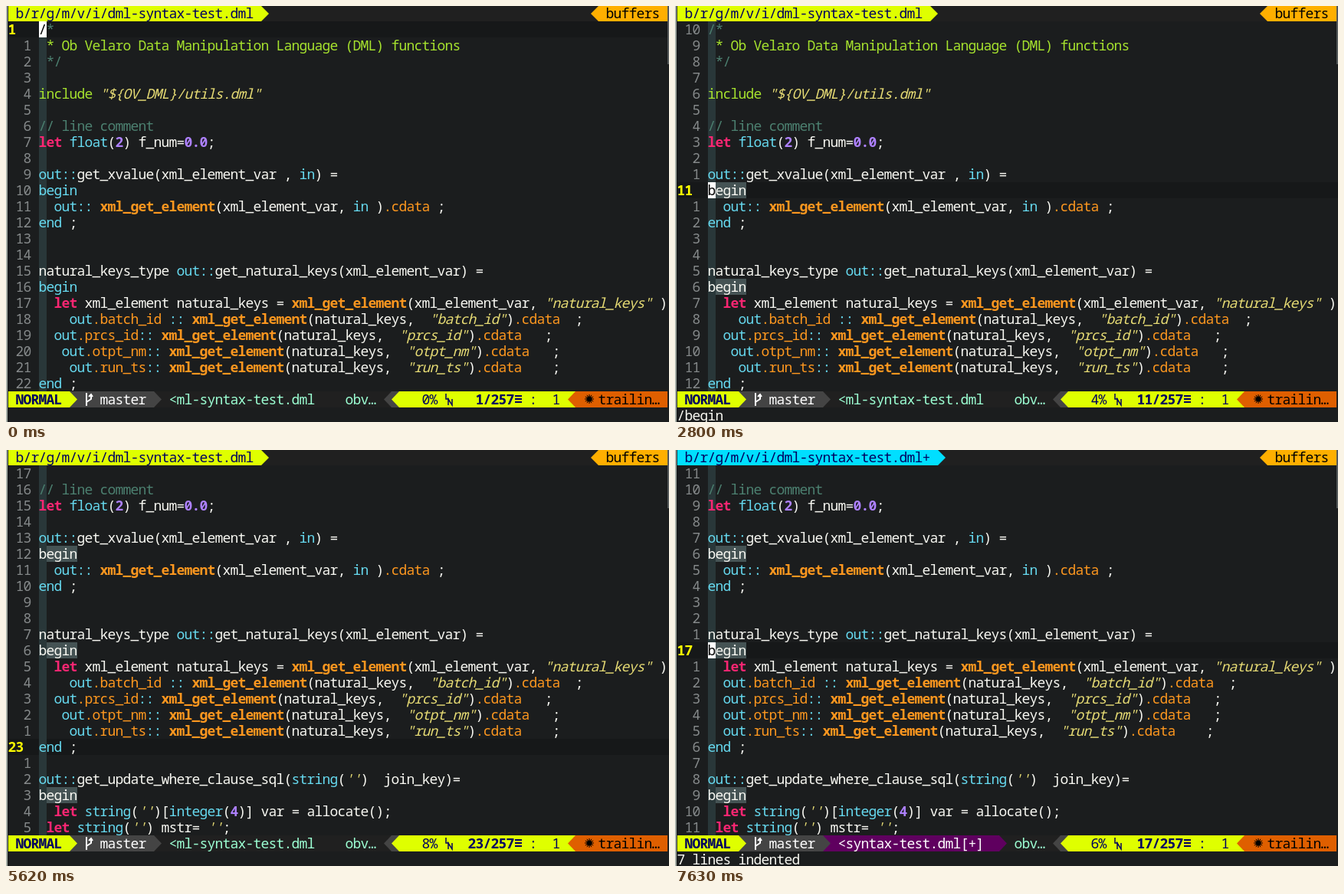
Write an HTML page with a canvas that moves like this. It is 865 px wide and 543 px high and loops after 8000 ms.

```html
<!DOCTYPE html>
<html lang="en">
<head>
<meta charset="utf-8">
<title>Editor session</title>
<style>
html, body { margin: 0; width: 100%; height: 100%; overflow: hidden; background: #1b1d1e; }
canvas { display: block; }
</style>
</head>
<body>
<canvas id="stage" width="865" height="543"></canvas>
<script>
const ctx = document.getElementById('stage').getContext('2d');
const W = 865, CELL = 10, ROW = 21, LEFT = 3, CODE = 43, ROWS = 23, LOOP = 8000;
const BG = '#1b1d1e', BAR = '#202020', WHITE = '#f8f8f2', CYAN = '#66d9ef', ORANGE = '#fd971f';
const FAMILY = '"Noto Sans Mono", "DejaVu Sans Mono", monospace';

const code = `/*
 * Ob Velaro Data Manipulation Language (DML) functions
 */

include "\${OV_DML}/utils.dml"

// line comment
let float(2) f_num=0.0;

out::get_xvalue(xml_element_var , in) =
begin
  out:: xml_get_element(xml_element_var, in ).cdata ;
end ;


natural_keys_type out::get_natural_keys(xml_element_var) =
begin
  let xml_element natural_keys = xml_get_element(xml_element_var, "natural_keys" )
    out.batch_id :: xml_get_element(natural_keys,  "batch_id").cdata  ;
  out.prcs_id:: xml_get_element(natural_keys,  "prcs_id").cdata   ;
   out.otpt_nm:: xml_get_element(natural_keys,  "otpt_nm").cdata   ;
    out.run_ts:: xml_get_element(natural_keys,  "run_ts").cdata    ;
end ;

out::get_update_where_clause_sql(string('')  join_key)=
begin
  let string('')[integer(4)] var = allocate();
 let string('') mstr= '';`.split('\n');
const indented = code.map((s, i) => i > 17 && i < 22 ? '  ' + s.trim() : s);

// Syntax rules: pattern, colour, font style
const rules = [
  [/\/\/.*|\/\*|\*\//, '#4c8070'],
  [/\* .*|\binclude\b/, '#a6e22e'],
  [/"[^"]*"|''/, '#e6db74', 'italic'],
  [/\blet\b/, '#f92672', 'bold'],
  [/\bxml_get_element\b/, ORANGE, 'bold'],
  [/\.[a-z_]+/, ORANGE],
  [/\b(?:out|in|begin|end|float|string|integer)\b|::/, CYAN],
  [/\b\d[\d.]*/, '#ae81ff', 'bold']
];
const lexer = new RegExp(rules.map(r => `(${r[0].source})`).join('|'), 'g');

const themes = {
  NORMAL: { a: '#dfff00', aText: '#00005f', b: '#444444', bText: '#ffffff', c: BAR, cText: '#9cffd3' },
  VISUAL: { a: '#ffaf00', aText: '#000000', b: '#ff5f00', bText: '#000000', c: '#5f0000', cText: '#ffffff' }
};
themes.COMMAND = themes.NORMAL;

// Each step changes some fields of the state before it
const steps = [
  [0, { top: 1, line: 1, col: 0, mode: 'NORMAL', cmd: '', cursor: 'text', found: 0, marks: false, picked: false, count: '', changed: false }],
  [1030, { cmd: '/', cursor: 'cmd' }],
  [1590, { cmd: '/b', mode: 'COMMAND', line: 2, col: 4, found: 1 }],
  [1860, { cmd: '/be', line: 11, col: 0, found: 2 }],
  [1980, { cmd: '/beg', found: 3 }],
  [2250, { cmd: '/begi', found: 4 }],
  [2400, { cmd: '/begin', found: 5 }],
  [2800, { mode: 'NORMAL', cursor: 'text', found: 0, marks: true }],
  [3730, { line: 17 }],
  [4850, { cmd: '-- VISUAL --', count: '1', cursor: '' }],
  [5000, { mode: 'VISUAL', cursor: 'text' }],
  [5620, { mode: 'NORMAL', cmd: '', count: '', cursor: '', line: 23, top: 6 }],
  [5770, { mode: 'VISUAL', cmd: '-- VISUAL --', count: '7', cursor: 'text', picked: true }],
  [7480, { cmd: '7 lines indented', count: '' }],
  [7630, { mode: 'NORMAL', line: 17, picked: false, changed: true }]
];
const stateAt = t => Object.assign({}, ...steps.filter(s => s[0] <= t).map(s => s[1]));

const rowTop = row => row * ROW - 1;

function box(x, y, w, h, color) {
  ctx.fillStyle = color;
  ctx.fillRect(x, y, w, h);
}

function text(s, x, row, color, style = '') {
  ctx.font = `${style} 18px ${FAMILY}`;
  ctx.letterSpacing = '0px';
  const gap = CELL - ctx.measureText('0').width;
  ctx.letterSpacing = gap + 'px';
  ctx.fillStyle = color;
  ctx.fillText(s, x + gap / 2, rowTop(row) + 17);
}

// Arrow one cell wide; dir 1 points right, -1 left
function arrow(x, row, dir, color) {
  const y = Math.max(0, rowTop(row)), end = rowTop(row + 1);
  const base = dir > 0 ? x : x + CELL;
  ctx.fillStyle = color;
  ctx.beginPath();
  ctx.moveTo(base, y);
  ctx.lineTo(base + dir * CELL, (y + end) / 2);
  ctx.lineTo(base, end);
  ctx.fill();
}

function codeText(s, row, plain) {
  if (plain) return text(s, CODE, row, WHITE);
  let at = 0;
  const put = (part, color, style) => {
    if (part.trim()) text(part, CODE + at * CELL, row, color, style);
    at += part.length;
  };
  for (const m of s.matchAll(lexer)) {
    put(s.slice(at, m.index), WHITE);
    const rule = rules[m.slice(1).findIndex(Boolean)];
    put(m[0], rule[1], rule[2]);
  }
  put(s.slice(at), WHITE);
}

function drawCode(st) {
  const lines = st.changed ? indented : code;
  for (let row = 1; row <= ROWS; row++) {
    const n = st.top + row - 1, s = lines[n - 1], y = rowTop(row);
    const here = n === st.line, cx = CODE + st.col * CELL;
    const picked = st.picked && n >= 17 && n < 23;
    const marked = st.marks && s === 'begin' && !picked;

    if (here) box(LEFT, y, W, ROW, '#161819');
    if (!here || st.cursor !== 'text') box(cx, y, CELL, ROW, '#293739');
    if (picked) box(CODE, y, Math.min(s.length + 1, 82) * CELL, ROW, '#403d3d');
    if (marked) box(CODE + CELL, y, 4 * CELL, ROW, '#455354');

    if (here) text(String(n), LEFT, row, '#ffff00', 'bold');
    else text(String(Math.abs(n - st.line)).padStart(3), LEFT, row, '#85898a');
    codeText(s, row, marked);

    if (here && st.found) {
      box(cx, y, st.found * CELL, ROW, '#c4be89');
      text(s.substr(st.col, st.found), cx, row, '#000');
    }
    if (here && st.cursor === 'text') {
      box(cx, y, CELL, ROW, '#fff');
      text(s[st.col], cx, row, '#000');
    }
  }
}

function drawTabs(st) {
  const name = 'b/r/g/m/v/i/dml-syntax-test.dml' + (st.changed ? '+' : '');
  const color = st.changed ? '#00dfff' : '#dfff00', w = (name.length + 2) * CELL;
  box(LEFT, 0, W, 20, BAR);
  box(LEFT, 0, w, 20, color);
  arrow(LEFT + w, 0, 1, color);
  text(name, LEFT + CELL, 0, '#00005f');
  box(773, 0, 90, 20, '#ffaf00');
  arrow(763, 0, -1, '#ffaf00');
  text('buffers', 783, 0, '#000');
}

function branchIcon(x, y, color) {
  ctx.strokeStyle = color;
  ctx.lineWidth = 2;
  ctx.beginPath();
  ctx.moveTo(x + 2, y + 2);
  ctx.lineTo(x + 2, y + 19);
  ctx.moveTo(x + 2, y + 14);
  ctx.lineTo(x + 8, y + 10);
  ctx.lineTo(x + 8, y + 5);
  ctx.moveTo(x + 5, y + 7);
  ctx.lineTo(x + 8, y + 4);
  ctx.lineTo(x + 10, y + 7);
  ctx.stroke();
}

function lineIcon(x, y, color) {
  ctx.strokeStyle = color;
  ctx.lineWidth = 1.5;
  ctx.beginPath();
  ctx.moveTo(x + 1, y + 3);
  ctx.lineTo(x + 1, y + 10);
  ctx.lineTo(x + 5, y + 10);
  ctx.moveTo(x + 4, y + 18);
  ctx.lineTo(x + 4, y + 10);
  ctx.lineTo(x + 9, y + 18);
  ctx.lineTo(x + 9, y + 10);
  ctx.stroke();
}

function sparkIcon(x, y) {
  ctx.strokeStyle = ctx.fillStyle = '#000';
  ctx.lineWidth = 1;
  ctx.beginPath();
  for (let i = 0; i < 12; i++) {
    const a = i * Math.PI / 6;
    ctx.moveTo(x, y);
    ctx.lineTo(x + 6 * Math.cos(a), y + 6 * Math.sin(a));
  }
  ctx.stroke();
  ctx.beginPath();
  ctx.arc(x, y, 3.5, 0, 7);
  ctx.fill();
}

function drawStatus(st) {
  const row = 24, y = rowTop(row), th = themes[st.mode];
  const bEdge = LEFT + (st.mode.length + 2) * CELL, cEdge = bEdge + 110;
  const fileBg = st.changed ? '#5f005f' : th.c;
  const file = st.changed ? '<syntax-test.dml[+]' : '<ml-syntax-test.dml';

  box(LEFT, y, W, ROW, th.c);
  if (st.changed) {
    box(cEdge, y, 423 - cEdge, ROW, fileBg);
    arrow(423, row, 1, fileBg);
  }
  box(bEdge, y, cEdge - bEdge, ROW, th.b);
  arrow(cEdge, row, 1, th.b);
  box(LEFT, y, bEdge - LEFT, ROW, th.a);
  arrow(bEdge, row, 1, th.a);

  text(st.mode, LEFT + CELL, row, th.aText, 'bold');
  branchIcon(bEdge + 20, y, th.bText);
  text('master', bEdge + 40, row, th.bText);
  const name = st.mode === 'COMMAND' ? '<' + file.slice(2) : file;
  text(name, 403 - name.length * CELL, row, st.changed ? '#fff' : th.cText);
  text('obv…', 443, row, th.cText);

  arrow(493, row, -1, th.b);
  box(503, y, CELL, ROW, th.b);
  arrow(503, row, -1, th.a);
  box(513, y, 230, ROW, th.a);
  const percent = Math.floor(st.line / 257 * 100) + '%';
  text(percent.padStart(4), 523, row, th.aText);
  lineIcon(573, y, th.aText);
  text(String(st.line).padStart(4) + '/257', 583, row, th.aText, 'bold');
  for (let i = 0; i < 3; i++) box(664, y + 5 + i * 4, 9, 2, th.aText);
  text(':' + String(st.col + 1).padStart(3), 683, row, th.aText);

  arrow(733, row, -1, '#df5f00');
  box(743, y, 120, ROW, '#df5f00');
  sparkIcon(761, y + 10);
  text('trailin…', 773, row, '#000');
}

function drawCommand(st) {
  text(st.cmd, LEFT, 25, WHITE);
  text(st.count, 753, 25, WHITE);
  if (st.cursor === 'cmd') box(LEFT + st.cmd.length * CELL, rowTop(25), CELL, ROW, '#fff');
}

function frame(now) {
  const st = stateAt(now % LOOP);
  box(0, 0, W, 543, BG);
  drawCode(st);
  drawTabs(st);
  drawStatus(st);
  drawCommand(st);
  box(0, 0, 2, 543, '#a9b0a8');
  box(863, 0, 2, 76, '#55595a');
  requestAnimationFrame(frame);
}
requestAnimationFrame(frame);
</script>
</body>
</html>
```
